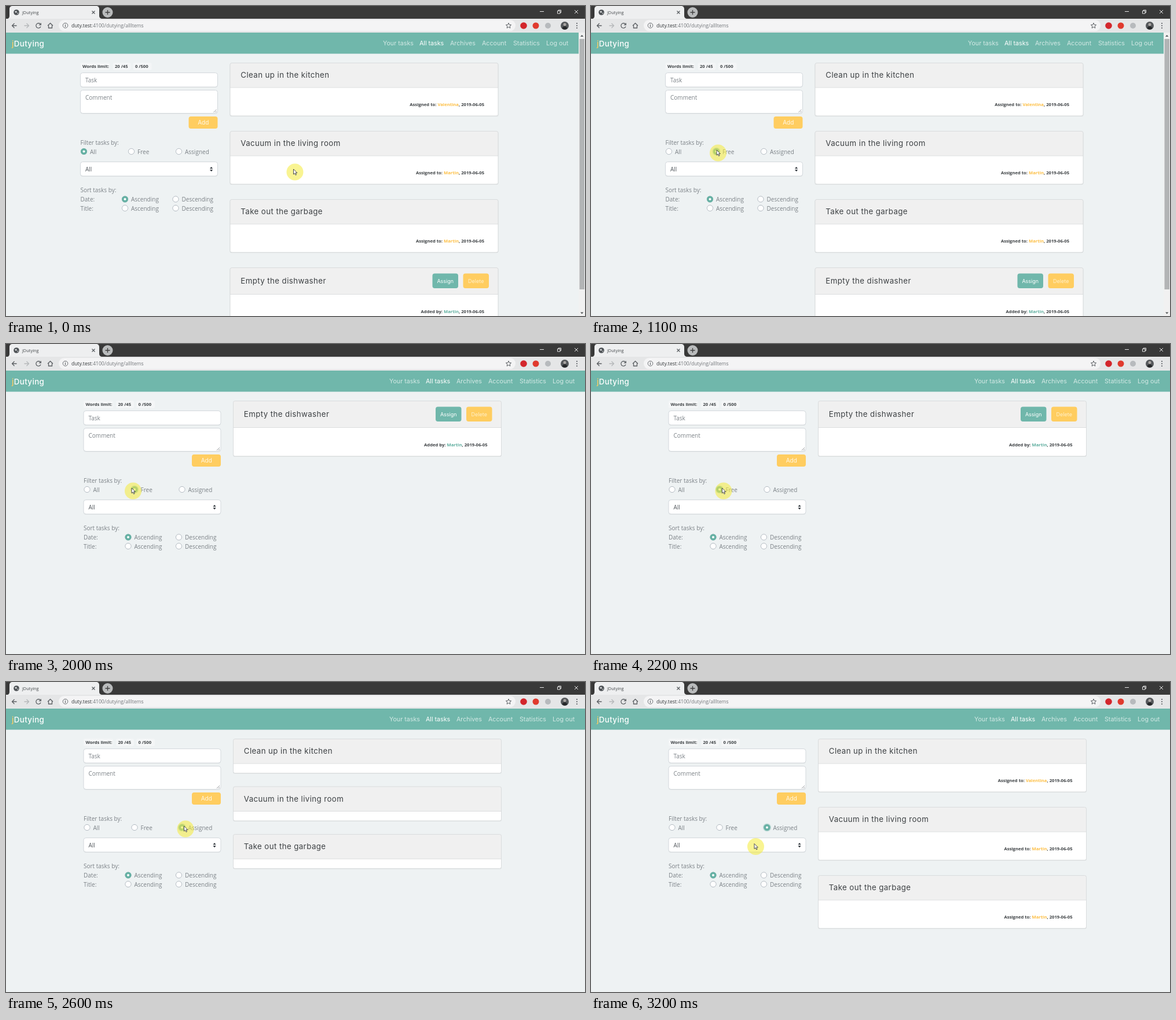
An HTML page that plays this animation: 1000x536 px, repeating every 3400 ms.

```html
<!DOCTYPE html>
<html lang="en">
<head>
<meta charset="utf-8">
<title>Task board</title>
<style>
html, body { margin: 0; width: 100%; height: 100%; overflow: hidden; background: #eef2f3; }
svg { display: block; }
text { font: 10px "Open Sans", "Noto Sans", sans-serif; fill: #7c8287; white-space: pre; }
.wide { font-family: Inter, "Open Sans", sans-serif; }
.head { font-size: 13.3px; letter-spacing: .4px; fill: #3d4144; }
.nav { font-size: 10.7px; fill: #d3e9e5; }
.bold { font-size: 7.65px; font-weight: 700; fill: #3c4043; }
.mid { text-anchor: middle; }
.end { text-anchor: end; }
.icon { fill: none; stroke: #5c6064; stroke-width: 1.3; }
</style>
</head>
<body>
<svg id="stage" width="1000" height="536" viewBox="0 0 1000 536"></svg>
<script>
const LOOP = 3400, STEP = 50;
const TEAL = '#70b7ab', YELLOW = '#ffcd60';
const CARDS = [
  { title: 'Clean up in the kitchen', who: 'Valentina' },
  { title: 'Vacuum in the living room', who: 'Martin' },
  { title: 'Take out the garbage', who: 'Martin' },
  { title: 'Empty the dishwasher', who: 'Martin', free: true }
];

// Pointer moves: start, end, target x, target y, easing
const easeOut = p => 1 - (1 - p) ** 2;
const smooth = p => p * p * (3 - 2 * p);
const MOVES = [
  [365, 900, 146, 254, easeOut],
  [900, 1000, 219.5, 254, smooth],
  [2150, 2400, 310, 254, smooth],
  [3050, 3200, 284.5, 284.5, smooth]
];

const ramp = (t, from, to) => Math.min(1, Math.max(0, (t - from) / (to - from)));
const text = (x, y, s, cls = '', style = '') =>
  `<text x="${x}" y="${y}" class="${cls}" style="${style}">${s}</text>`;
const rect = (x, y, w, h, fill, r = 0, extra = '') =>
  `<rect x="${x}" y="${y}" width="${w}" height="${h}" rx="${r}" fill="${fill}" ${extra}/>`;
const disc = (x, y, r, fill, extra = '') =>
  `<circle cx="${x}" cy="${y}" r="${r}" fill="${fill}" ${extra}/>`;
const path = (d, extra = 'class="icon"') => `<path d="${d}" ${extra}/>`;

function browser() {
  return rect(0, 0, 1000, 22, '#393939') +
    path('M3 22Q6 21 6 17V5Q6 1 10 0H157Q161 1 161 5V17Q161 21 165 22Z', 'fill="#eeeff0"') +
    disc(18, 11, 4.8, '#4f5357') +
    path('M15 9.5l3-1l1 2l-2 1.500zM19.500 12l2-.5l-1.500 3z', 'fill="#dfe1e2"') +
    text(28, 13.7, 'jDutying', '', 'font-size:7.4px;fill:#44484b') +
    path('M148.500 8.500l5 5m0-5l-5 5') +
    disc(175.500, 11, 9, '#b9bbbc') +
    path('M171.500 11h8m-4-4v8', 'class="icon" style="stroke:#3d3d3d"') +
    path('M922 9.500h7M952.500 8.500h4.500v4.500h-4.500zM954 8.500v-1.500h4.500v4.500h-1.500M982 7l6 6m0-6l-6 6',
      'fill="none" stroke="#e4e4e4"') +
    rect(0, 22, 1000, 24, '#e5e6e7') +
    rect(91, 24, 789, 19.500, '#f4f4f5', 9.700) +
    path('M18.500 34h-8m4-4l-4 4l4 4') +
    path('M31.500 34h8m-4-4l4 4l-4 4', 'class="icon" style="stroke:#b5b8ba"') +
    path('M59.500 31.500A4.200 4.200 0 1 0 60 35.500M60.300 29.500v3.200h-3.200') +
    path('M72 34l4.500-4.300l4.500 4.300M73.500 33.500v4.500h6v-4.500') +
    disc(102.500, 33.700, 4.300, 'none', 'stroke="#6a6e72"') +
    path('M102.500 33v3M102.500 31v1') +
    text(113, 37, 'duty.test<tspan fill="#73777b">:4100/dutying/allItems</tspan>', '',
      'font-size:8.6px;fill:#33373a') +
    path('M868 29.300l1.300 3.100l3.300.3l-2.500 2.200l.8 3.300l-2.900-1.800l-2.900 1.800l.8-3.300l-2.500-2.200l3.300-.3z',
      'fill="none" stroke="#5c6064"') +
    disc(894, 34, 5.800, '#d3262c') + disc(915, 34, 5.500, '#e03a2e') + disc(936, 34, 5, '#b7babd') +
    disc(965, 34, 7, '#55585b') + disc(965, 32, 2.500, '#a9a5a2') +
    path('M960.500 39q1-4 4.500-4t4.500 4q-4.500 3.500-9 0z', 'fill="#26282a"') +
    [30, 34, 38].map(y => disc(986, y, 1.100, '#5c6064')).join('');
}

function navbar(shift) {
  const links = [[651, 'Your tasks'], [714, 'All tasks'], [767, 'Archives'],
    [822, 'Account'], [876, 'Statistics'], [933, 'Log out']];
  return rect(0, 46, 1000, 36.500, TEAL) +
    text(10, 69.500, `<tspan fill="${YELLOW}">j</tspan>Dutying`, 'wide head', 'fill:#fff;font-weight:500') +
    links.map(([x, s], i) =>
      text(x + shift, 68.300, s, 'wide nav', i === 1 ? 'fill:#fff' : '')).join('');
}

function scrollbar() {
  return rect(989, 46, 11, 490, '#f1f1f1') + rect(990.500, 57, 8.500, 433, '#b2b4b5') +
    path('M992 53l2.700-3l2.700 3zM992 529.500l2.700 3l2.700-3z', 'fill="#55585a"');
}

function radio(x, y, on, focus = 0) {
  return (focus ? disc(x, y, 7, TEAL, `opacity="${0.4 * focus}"`) : '') +
    disc(x, y, 5.100, '#fff', 'stroke="#adb5bd" stroke-width=".9"') +
    (on ? `<g opacity="${on}">${disc(x, y, 5.500, '#66b1a4')}${disc(x, y, 2, '#fff')}</g>` : '');
}

function field(y, h) {
  return rect(128.500, y + 1, 237, h, '#000', 4, 'opacity=".07"') +
    rect(128.500, y, 237, h, '#fff', 4, 'stroke="#d3d8dc"');
}

function form(free, assigned) {
  const badge = (x, w, s) => rect(x - 3.500, 98, w, 13, '#f4f6f7', 3) + text(x, 107, s, 'bold');
  const sortRow = (y, label, on) => text(128.500, y + 4, label) +
    radio(205.500, y, on) + text(216, y + 4, 'Ascending') +
    radio(293, y, 0) + text(303.500, y + 4, 'Descending');
  return badge(132, 51, 'Words limit:') + badge(188, 31, '20 /45') + badge(223, 32, '0 /500') +
    field(115.500, 24.500) + text(137, 132, 'Task') +
    field(145.500, 40) + text(137, 162, 'Comment') +
    path('M358.500 184l5-5m-2 5l2-2', 'fill="none" stroke="#80868a" stroke-width=".8"') +
    rect(315.500, 191, 50, 21, YELLOW, 4) + text(340.800, 204.500, 'Add', 'wide mid', 'fill:#fff8e8') +
    text(128.500, 240, 'Filter tasks by:') +
    radio(134.500, 251.500, 1 - free) + text(145, 255.500, 'All') +
    radio(216.500, 251.500, free - assigned, free - assigned) + text(227, 255.500, 'Free') +
    radio(298.500, 251.500, assigned, assigned) + text(309, 255.500, 'Assigned') +
    field(269.500, 24.500) + text(137, 286, 'All', '', 'fill:#555b60') +
    path('M352 281.300l2.600-3.300l2.600 3.300zM352 283l2.600 3.300l2.600-3.300z', 'fill="#343a40"') +
    text(128.500, 322, 'Sort tasks by:') +
    sortRow(334, 'Date:', 1) + sortRow(349.500, 'Title:', 0);
}

function card({ title, who, free }, y, open) {
  const head = free ? 46.500 : 43, full = free ? 96 : 92, h = full * open;
  if (h < 2) return path(`M388 ${y + 0.500}H848`, 'stroke="#d3d7d8"');
  const button = (x, s, fill, ink) => rect(x, 10.500, 44.500, 25.500, fill, 4) +
    text(x + 22.250, 26.800, s, 'wide mid', `font-size:9px;fill:${ink}`);
  const color = free ? '#5fae9f' : '#fdbf45';
  return rect(386.500, y + 1, 464, h, '#000', 3, 'opacity=".08"') +
    rect(387, y + 0.500, 463, h - 0.500, '#fff', 3) +
    `<svg x="387" y="${y}" width="463" height="${h}">` +
    path(`M0 ${head}V3q0-3 3-3H460q3 0 3 3V${head}z`, 'fill="#f0f0f0"') +
    path(`M0 ${head}H463`, 'stroke="#dcdedf"') +
    text(18.300, head / 2 + 4.700, title, 'wide head') +
    (free ? button(349.500, 'Assign', TEAL, '#fff') + button(402.500, 'Delete', YELLOW, '#fff0cc') : '') +
    text(439, head + 32.300,
      `${free ? 'Added by' : 'Assigned to'}: <tspan fill="${color}">${who}</tspan>, 2019-06-05`, 'bold end') +
    '</svg>' +
    rect(387, y + 0.500, 463, h - 0.500, 'none', 3, 'stroke="#d9dcdd"');
}

function cardList(t) {
  const list = t < 1650 ? CARDS : CARDS.filter(c => !!c.free === t < 2400);
  const open = t < 1650 ? 1 : smooth(t < 2400 ? ramp(t, 1650, 1900) : ramp(t, 2450, 2700));
  const pitch = 17 + 101 * open;
  return list.map((c, i) => card(c, 98 + i * pitch, open)).join('');
}

function pointer(t) {
  let x = 499, y = 287;
  for (const [from, to, tx, ty, ease] of MOVES) {
    const p = ease(ramp(t, from, to));
    x += (tx - x) * p;
    y += (ty - y) * p;
  }
  return disc(x, y, 14.500, '#f5ec3c', 'opacity=".56"') +
    path(`M${x - 2.500} ${y - 5}v9l2.100-1.900l1.500 3.300l1.500-.7l-1.500-3.200h2.800z`,
      'fill="#fff" stroke="#3b3c40" stroke-width=".9"');
}

function picture(t) {
  const scrolls = t < 1650;
  const free = ramp(t, 1000, 1100), assigned = ramp(t, 2400, 2500);
  return rect(0, 0, 1000, 536, '#eef2f3') +
    `<g transform="translate(${scrolls ? 0 : 5.500})">${form(free, assigned)}${cardList(t)}</g>` +
    navbar(scrolls ? 0 : 11) + (scrolls ? scrollbar() : '') + browser() + pointer(t);
}

const stage = document.getElementById('stage');
let shown = -1;
function tick() {
  const t = Math.floor(performance.now() % LOOP / STEP) * STEP;
  if (t !== shown) stage.innerHTML = picture(shown = t);
  requestAnimationFrame(tick);
}
tick();
</script>
</body>
</html>
```
